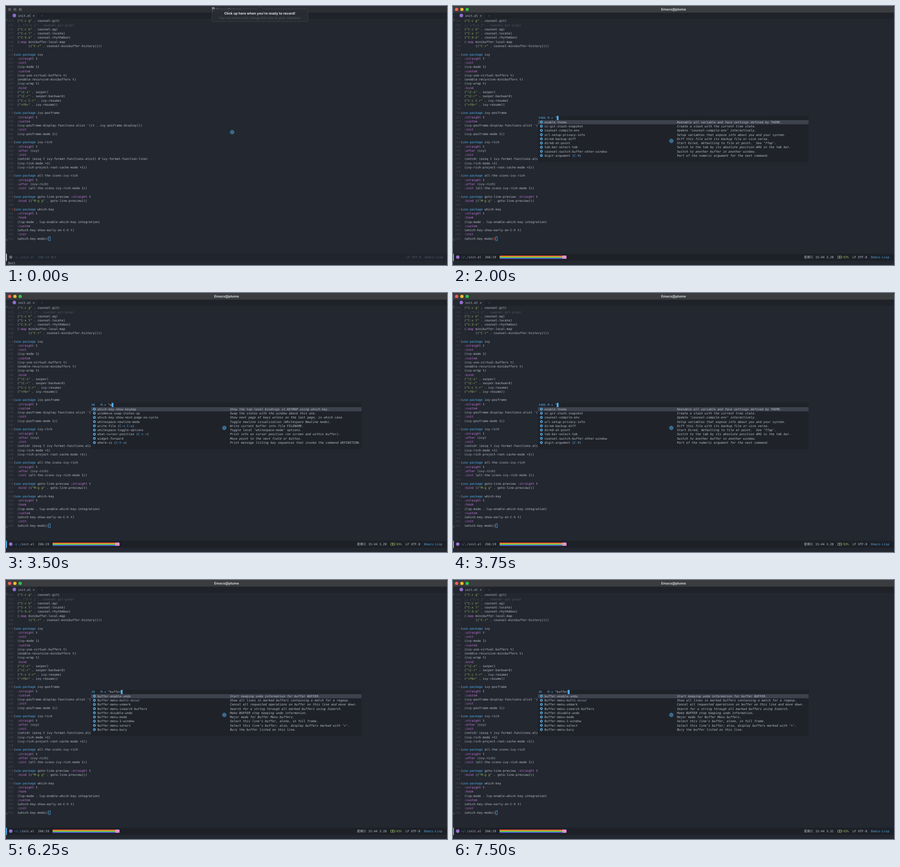
These frames come from a looping animation (975x574 px, 8000 ms). An HTML page:

```html
<!DOCTYPE html>
<html lang="en">
<head>
<meta charset="utf-8">
<title>Editor session</title>
<style>
html, body { margin: 0; width: 100%; height: 100%; overflow: hidden; background: #23272f; }
svg { display: block; width: 975px; height: 574px; }
text { font: 6.754px "DejaVu Sans Mono", monospace; fill: #bbc2cf; white-space: pre; text-rendering: geometricPrecision; }
.ui { font-family: Inter, sans-serif; text-anchor: middle; }
.title { font-size: 7.5px; font-weight: 700; }
.num { fill: #434850; }
.blue { fill: #51afef; }
.key { fill: #c678dd; }
.str { fill: #98be65; }
.note { fill: #555b63; }
.idle { fill: #4a5b70; }
.doc { font-style: italic; }
.cjk { font-family: "Noto Sans CJK SC", "Noto Sans CJK", sans-serif; font-size: 6.9px; }
.match .pair { fill: #ff6c5b; font-weight: 700; }
</style>
</head>
<body>
<svg id="stage" viewBox="0 0 975 574"></svg>
<script>
const CHAR = 4.066, LINE = 9.275, LOOP = 8000;

const source = String.raw`  ("C-c g" . counsel-git)
  ;; ("C-c j" . counsel-git-grep)
  ("C-c k" . counsel-ag)
  ("C-x l" . counsel-locate)
  ("C-S-o" . counsel-rhythmbox)
  (:map minibuffer-local-map
        (("C-r" . counsel-minibuffer-history))))

(use-package ivy
  :straight t
  :init
  (ivy-mode 1)
  :custom
  (ivy-use-virtual-buffers t)
  (enable-recursive-minibuffers t)
  (ivy-wrap t)
  :bind
  ("\C-s" . swiper)
  ("\C-r" . swiper-backward)
  ("C-c C-r" . ivy-resume)
  ("<f6>" . ivy-resume))

(use-package ivy-posframe
  :straight t
  :custom
  (ivy-posframe-display-functions-alist '((t . ivy-posframe-display)))
  :init
  (ivy-posframe-mode 1))

(use-package ivy-rich
  :straight t
  :after (ivy)
  :init
  (setcdr (assq t ivy-format-functions-alist) #'ivy-format-function-line)
  (ivy-rich-mode +1)
  (ivy-rich-project-root-cache-mode +1))

(use-package all-the-icons-ivy-rich
  :straight t
  :after (ivy-rich)
  :init (all-the-icons-ivy-rich-mode 1))

(use-package goto-line-preview :straight t
  :bind (("M-g g" . goto-line-preview)))

(use-package which-key
  :straight t
  :hook
  (lsp-mode . lsp-enable-which-key-integration)
  :custom
  (which-key-show-early-on-C-h t)
  :init
  (which-key-mode))`.split("\n");

// Each list: match count, then "command|description" rows.
const lists = {
  all: [3486, `enable-theme|Reenable all variable and face settings defined by THEME.
vc-git-stash-snapshot|Create a stash with the current tree state.
counsel-compile-env|Update ‘counsel-compile-env’ interactively.
url-setup-privacy-info|Setup variables that expose info about you and your system.
dired-backup-diff|Diff this file with its backup file or vice versa.
dired-at-point|Start Dired, defaulting to file at point.  See ‘ffap’.
tab-bar-select-tab|Switch to the tab by its absolute position ARG in the tab bar.
counsel-switch-buffer-other-window|Switch to another buffer in another window.
digit-argument (C-9)|Part of the numeric argument for the next command.`],
  w: [98, `which-key-show-keymap|Show the top-level bindings in KEYMAP using which-key.
windmove-swap-states-up|Swap the states with the window above this one.
which-key-show-next-page-no-cycle|Show next page of keys unless on the last page, in which case
whitespace-newline-mode|Toggle newline visualization (Whitespace Newline mode).
write-file (C-x C-w)|Write current buffer into file FILENAME.
whitespace-toggle-options|Toggle local ‘whitespace-mode’ options.
what-cursor-position (C-x =)|Print info on cursor position (on screen and within buffer).
widget-forward|Move point to the next field or button.
where-is (C-h w)|Print message listing key sequences that invoke the command DEFINITION.`],
  wh: [40, `which-key-show-keymap|Show the top-level bindings in KEYMAP using which-key.
which-key-show-next-page-no-cycle|Show next page of keys unless on the last page, in which case
whitespace-newline-mode|Toggle newline visualization (Whitespace Newline mode).
whitespace-toggle-options|Toggle local ‘whitespace-mode’ options.
what-cursor-position (C-x =)|Print info on cursor position (on screen and within buffer).
which-key-enable-god-mode-support|Enable support for god-mode if non-nil.
whois-reverse-lookup|
where-is (C-h w)|Print message listing key sequences that invoke the command DEFINITION.
which-key-setup-side-window-right-bottom|Apply suggested settings for side-window that opens on right`],
  b: [168, `browse-url|Ask a WWW browser to load URL.
buffer-enable-undo|Start keeping undo information for buffer BUFFER.
bookmark-save|Save currently defined bookmarks in FILE.
Buffer-menu-multi-occur|Show all lines in marked buffers containing a match for a regexp.
bug-reference-mode|Toggle hyperlinking bug references in the buffer (Bug Reference mode).
binhex-decode-region|Binhex decode region between START and END.
beginning-of-line-text|Move to the beginning of the text on this line.
browse-web (eww)|Fetch URL and render the page.
byte-recompile-directory|Recompile every ‘.el’ file in DIRECTORY that needs recompilation.`],
  buffer: [36, `buffer-enable-undo|Start keeping undo information for buffer BUFFER.
Buffer-menu-multi-occur|Show all lines in marked buffers containing a match for a regexp.
Buffer-menu-unmark|Cancel all requested operations on buffer on this line and move down.
Buffer-menu-isearch-buffers|Search for a string through all marked buffers using Isearch.
buffer-disable-undo|Make BUFFER stop keeping undo information.
Buffer-menu-mode|Major mode for Buffer Menu buffers.
Buffer-menu-1-window|Select this line’s buffer, alone, in full frame.
Buffer-menu-select|Select this line’s buffer; also, display buffers marked with ‘>’.
Buffer-menu-bury|Bury the buffer listed on this line.`],
  menu: [33, `Buffer-menu-multi-occur|Show all lines in marked buffers containing a match for a regexp.
Buffer-menu-unmark|Cancel all requested operations on buffer on this line and move down.
Buffer-menu-isearch-buffers|Search for a string through all marked buffers using Isearch.
Buffer-menu-mode|Major mode for Buffer Menu buffers.
Buffer-menu-1-window|Select this line’s buffer, alone, in full frame.
Buffer-menu-select|Select this line’s buffer; also, display buffers marked with ‘>’.
Buffer-menu-bury|Bury the buffer listed on this line.
Buffer-menu-save|Mark buffer on this Buffer Menu line to be saved.
Buffer-menu-delete|Mark the buffer on this Buffer Menu line for deletion.`]
};

// time, typed text, list shown
const typing = [
  [2000, "", "all"], [2500, "w", "w"], [2750, "wh", "wh"], [3500, "w", "w"], [3750, "", "all"],
  [5500, "b", "b"], [5750, "buf", "buffer"], [6000, "buff", "buffer"], [6250, "buffer", "buffer"],
  [6500, "buffer-m", "menu"], [6750, "buffer-men", "menu"], [7250, "buffer-m", "menu"], [7500, "buffer", "buffer"]
];
const pointer = [
  [0, 500, 279.5], [250, 492, 293], [500, 485, 304], [750, 479.7, 312], [1000, 481, 310.3], [1250, 482.7, 299]
];
const echo = [[0, "Quit"], [1500, ""], [1750, "ESC-"], [2000, ""]];

const at = (table, t) => table.findLast(row => row[0] <= t);
const esc = s => s.replace(/&/g, "&amp;").replace(/</g, "&lt;");
const span = (cls, s) => `<tspan class="${cls}">${s}</tspan>`;
const text = (x, y, s, cls = "") => `<text xml:space="preserve" x="${x}" y="${y}" class="${cls}">${s}</text>`;
const rect = (x, y, w, h, fill, more = "") => `<rect x="${x}" y="${y}" width="${w}" height="${h}" fill="${fill}" ${more}/>`;
const dot = (x, y, r, fill) => `<circle cx="${x}" cy="${y}" r="${r}" fill="${fill}"/>`;
const group = (id, body) => `<g id="${id}">${body}</g>`;

function highlight(line) {
  return esc(line).replace(/;;.*|"[^"]*"|:[a-z]+|^\(use-package/g, m => {
    if (m[0] === ";") return span("note", m);
    if (m[0] === '"') return span("str", m);
    if (m[0] === ":") return span("key", m);
    return "(" + span("blue", "use-package");
  });
}

function codeView() {
  const last = source.length - 1, open = source.indexOf("(use-package which-key");
  return source.map((line, i) => {
    let html = highlight(line);
    if (i === open) html = html.replace("(", span("pair", "("));
    if (i === last) html = html.replace(/\)$/, span("pair", ")"));
    const y = 35.3 + i * LINE;
    return text(4.4, y, 214 + i, "num") + text(16.9, y, html);
  }).join("");
}

const gear = (x, y) =>
  `<g fill="none" stroke="#5aaee8"><circle cx="${x}" cy="${y}" r="2" stroke-width="1.5"/>` +
  `<circle cx="${x}" cy="${y}" r="2.9" stroke-width="0.9" stroke-dasharray="1.14"/></g>`;

function popupView(typed, name) {
  const [count, rows] = lists[name];
  const prompt = String(count).padEnd(5) + "M-x ";
  const cursorX = 188.7 + (prompt.length + 1 + typed.length) * CHAR;
  return rect(188, 243, 598, 103, "#1f2229") + rect(188, 253, 598, 9.2, "#3d424d") +
    text(188.7, 250.3, span("blue", prompt) + "^" + typed) +
    rect(cursorX, 243.6, CHAR, 9.2, "#51afef") +
    rows.split("\n").map((row, i) => {
      const [command, doc] = esc(row).split("|"), y = 257.3 + i * LINE;
      return gear(195.4, y) +
        text(202.3, y + 2.4, command.replace(/C-[^)]+/, k => span("blue", k))) +
        text(495.3, y + 2.4, doc, "doc");
    }).join("");
}

const lights = colors => colors.map((c, i) => dot(8 + i * 11.7, 7.5, 3.6, c)).join("");
const stripes = ["#f0322c", "#f79a2e", "#f5e63c", "#4fc83a", "#2f9bea", "#6a4fd8"];

const idleFrame =
  rect(0, 0, 975, 14.6, "#2b2e33") + lights(Array(3).fill("#55575a")) +
  rect(0, 549, 975, 16, "#20242c") + rect(0, 549, 2, 16, "#bbc2cf") +
  dot(10.5, 556.6, 3.7, "#5a6472") +
  text(18, 559.4, "~/./init.el  266:19 Bot", "idle") +
  text(885.3, 559.4, "LF UTF-8  Emacs-Lisp", "idle");

const activeFrame =
  rect(0, 0, 975, 14.6, "#3a3c3f") + lights(["#fb5f57", "#fcbb2e", "#2fc741"]) +
  rect(0, 549, 975, 16, "#1d2027") + rect(0, 549, 2, 16, "#51afef") +
  dot(10.5, 556.6, 3.8, "#9a6fd0") +
  text(18, 559.4, span("blue", "~/./") + "init.el  266:19") +
  stripes.map((c, i) => rect(103, 553 + i * 1.25, 139, 1.3, c)).join("") +
  rect(241.5, 553, 9.5, 7.3, "#e58fd0", 'rx="1.5"') +
  text(776, 559.4, "星期三", "cjk") + text(801, 559.4, "15:44") +
  `<rect x="850.5" y="554.2" width="8.6" height="5" rx="1" fill="none" stroke="#98be65" stroke-width=".9"/>` +
  rect(859.6, 555.7, 1, 2, "#98be65") +
  `<path d="M855.4 553.6l-2.3 3.4h1.7l-.7 2.7 2.5-3.6h-1.7z" fill="#98be65"/>` +
  text(862.7, 559.4, "93%", "str") + text(883.2, 559.4, "LF UTF-8") +
  text(924, 559.4, "Emacs-Lisp", "blue");

const overlay =
  `<path d="M459.5 6.5H556l6-6.5 6 6.5h95.500a4 4 0 0 1 4 4v20a4 4 0 0 1-4 4h-204a4 4 0 0 1-4-4v-20a4 4 0 0 1 4-4z" fill="#292d33" fill-opacity=".88" stroke="#464a50" stroke-width=".7"/>` +
  `<text class="ui" x="561" y="18.700" style="font-size:7.6px;font-weight:700;fill:#dddfe1">Click up here when you're ready to record!</text>` +
  `<text class="ui" x="561" y="28.600" style="font-size:7.35px;fill:#54585e">You can move and change the size of your selection</text>`;

const stage = document.getElementById("stage");
stage.innerHTML =
  rect(0, 0, 975, 574, "#23272f") +
  rect(0, 14.6, 975, 13.9, "#1f2229") + rect(0, 14.6, 69, 13.9, "#23272f") +
  dot(18.4, 21, 3.9, "#8f6cc9") + text(26.700, 24.3, "init.el") +
  text(59.2, 24.3, "×") + text(77.800, 24.3, "+", "note") +
  group("code", codeView()) +
  `<path d="M1 34v-4h2.500M1 515v4h2.500" fill="none" stroke="#6b727c" stroke-width=".8"/>` +
  `<rect id="caret" x="94.500" y="511.300" width="3.600" height="8.600" stroke="#51afef" stroke-width=".8"/>` +
  group("idle", idleFrame) + group("active", activeFrame) +
  text(825.4, 559.4, "", "load") + text(4.4, 571.6, "", "echo") +
  `<path id="page" d="M455.500 2.500h4l2.500 2.500v7h-6.500z" fill="#8b8d90"/>` +
  `<text id="title" class="ui title" y="9.900">Emacs@plume</text>` +
  group("popup", "") + group("overlay", overlay) +
  `<circle id="pointer" r="4.500" fill="#38698c" stroke="#437ba1" stroke-width=".6"/>` +
  `<path d="M0 0h4a4 4 0 0 0-4 4zM975 0h-4a4 4 0 0 1 4 4z" fill="#14161a"/>`;

const el = id => document.getElementById(id);
const show = (id, on) => { el(id).style.display = on ? "" : "none"; };
let popupStep;

function draw(t) {
  const focused = t >= 500, prompting = t >= 2000;
  show("overlay", t < 250);
  show("idle", !focused);
  show("active", focused);
  show("page", !prompting);
  show("popup", prompting);
  el("title").setAttribute("x", prompting ? 487.5 : 492.5);
  el("title").style.fill = focused ? "#d0d2d4" : "#74777b";
  el("caret").setAttribute("fill", focused && !prompting ? "#51afef" : "none");
  el("code").classList.toggle("match", t < 2250);
  stage.querySelector(".load").textContent = focused ? (t < 6750 ? "3.28" : "3.31") : "";
  stage.querySelector(".echo").textContent = at(echo, t)[1];
  const [, x, y] = at(pointer, t);
  el("pointer").setAttribute("transform", `translate(${x} ${y})`);
  const step = at(typing, t);
  if (step && step !== popupStep) el("popup").innerHTML = popupView(step[1], step[2]);
  popupStep = step;
}

const start = performance.now();
function tick() {
  draw((performance.now() - start) % LOOP);
  requestAnimationFrame(tick);
}
tick();
</script>
</body>
</html>
```
